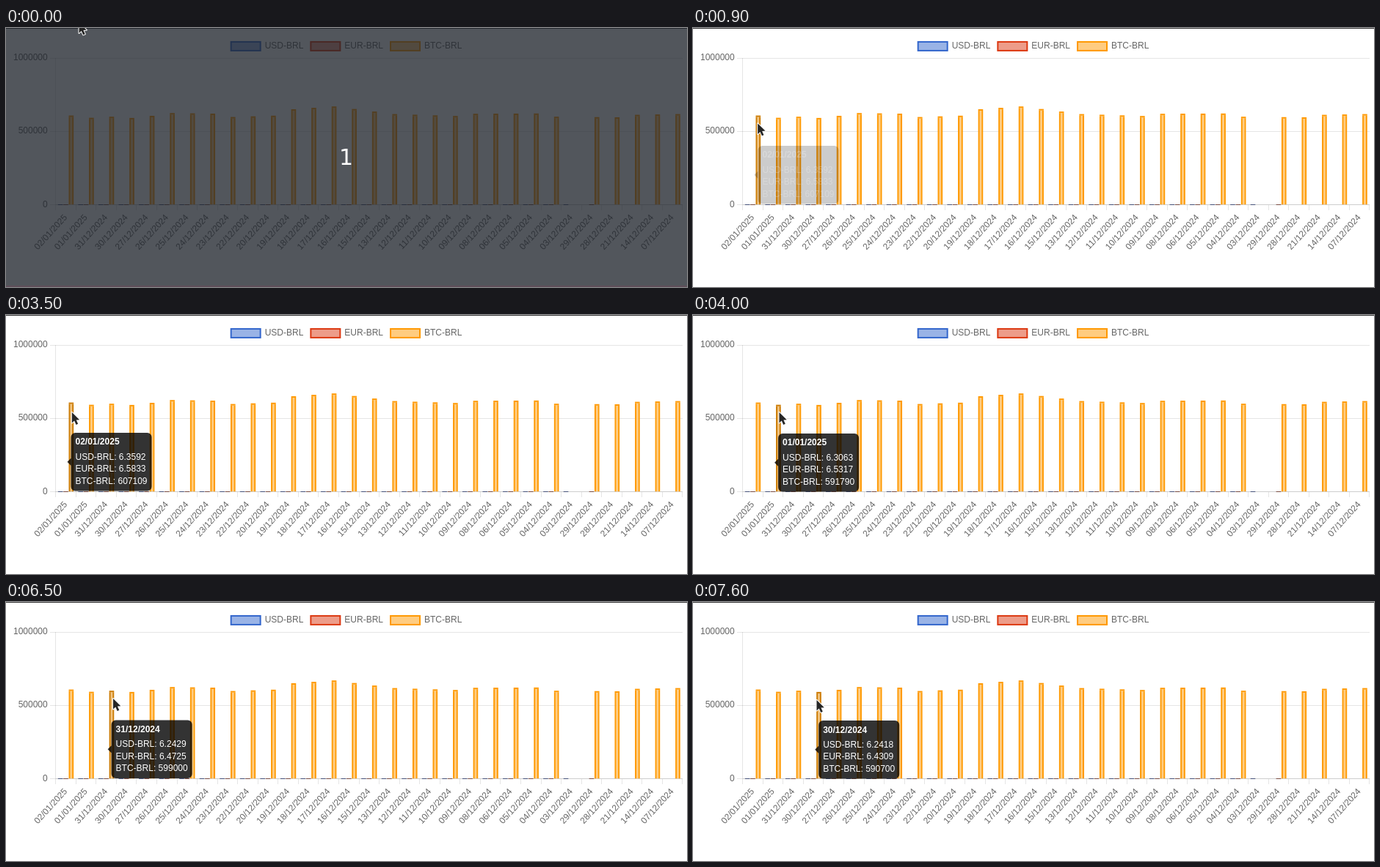
Animation, 928 px wide and 354 px high, one loop 8000 ms. Source, as an HTML page with a canvas:

```html
<!DOCTYPE html>
<html lang="en">
<head>
<meta charset="utf-8">
<title>Exchange rates</title>
<style>
html, body { margin: 0; width: 100%; height: 100%; overflow: hidden; background: #fff; }
canvas { display: block; width: 928px; height: 354px; }
</style>
</head>
<body>
<canvas id="stage" width="928" height="354"></canvas>
<script>
const ctx = document.getElementById('stage').getContext('2d');
const LOOP = 8000, STEP = 100;
const FONT = '12px "Liberation Sans", Arial, sans-serif';
const LEFT = 67.72, RIGHT = 921.9, BASE = 241.23, SCALE = 200.3e-6;
const LINE = 14.4, TILT = -47.7 * Math.PI / 180;

const series = [
  { name: 'USD-BRL', line: '#3366cc', fill: '#99b3e6', thin: '#46527a' },
  { name: 'EUR-BRL', line: '#dc3912', fill: '#ed9c89', thin: '#7a4c42' },
  { name: 'BTC-BRL', line: '#ff9900', fill: '#ffcc80' }
];

// Weekdays come first, days off follow at the end of the axis
const month = Array.from({ length: 29 }, (_, i) => 31 - i);
const isOff = d => d % 7 === 0 || d === 29;
const days = [...month.filter(d => !isOff(d)), ...month.filter(isOff)];
const dates = ['02/01/2025', '01/01/2025',
  ...days.map(d => String(d).padStart(2, '0') + '/12/2024')];
const NO_BTC = dates.indexOf('03/12/2024');

// Quotes shown in the tooltips
const quotes = [
  [6.3592, 6.5833, 607109],
  [6.3063, 6.5317, 591790],
  [6.2429, 6.4725, 599000],
  [6.2418, 6.4309, 590700]
];
// Later BTC prices, in thousands, run straight between these slots
const knots = [[4, 605], [5, 624], [7, 620], [8, 597], [10, 606], [11, 650], [13, 669],
  [16, 617], [19, 604], [20, 619], [23, 621], [24, 599], [27, 595], [28, 612], [30, 617]];

// Pointer moves: start, duration, goal x, goal y
const moves = [
  [400, 600, 87.5, 132.5], [3400, 400, 117, 132.5], [4900, 400, 144.5, 130.5],
  [6400, 100, 145.5, 131.5], [6600, 400, 166, 133.5], [7300, 100, 168, 133.5]
];
const hovers = [
  { from: 900, to: 3600, fade: 200 },
  { from: 3700, to: 5000, fade: 200 },
  { from: 5200, to: 6700, fade: 200 },
  { from: 7600, to: LOOP, fade: 50 }
];

const slotW = (RIGHT - LEFT) / dates.length;
const groupW = slotW * 0.8 / 3, barW = groupW * 0.9;
const clamp = v => Math.max(0, Math.min(1, v));
const mix = (a, b, k) => a + (b - a) * k;
const ease = k => k < 0.5 ? 4 * k ** 3 : 1 - 4 * (1 - k) ** 3;
const center = i => LEFT + slotW * (i + 0.5);
const barX = (i, k) => center(i) + (k - 1) * groupW - barW / 2;
const valueY = v => BASE - v * SCALE;

function price(i) {
  if (quotes[i]) return quotes[i][2];
  const n = knots.findIndex(k => k[0] >= i);
  const b = knots[n], a = knots[n - 1] || b;
  return 1000 * mix(b[1], a[1], (b[0] - i) / (b[0] - a[0] || 1));
}

function rect(color, x, y, w, h) {
  ctx.fillStyle = color;
  ctx.fillRect(x, y, w, h);
}

function text(str, x, y, color, align = 'left', font = FONT) {
  ctx.font = font;
  ctx.fillStyle = color;
  ctx.textAlign = align;
  ctx.textBaseline = 'middle';
  ctx.fillText(str, x, y);
}

function drawLegend() {
  series.forEach((s, i) => {
    const x = 306.67 + i * 108.67, y = 18.93;
    rect(s.fill, x, y, 40, 12);
    ctx.strokeStyle = s.line;
    ctx.lineWidth = 2;
    ctx.strokeRect(x, y, 40, 12);
    text(s.name, x + 46, y + 6, '#666');
  });
}

function drawAxes() {
  const grid = 'rgba(0,0,0,0.1)';
  for (const v of [1000000, 500000, 0]) {
    const y = valueY(v);
    rect(grid, 60, Math.round(y), 862, 1);
    text(v, LEFT - 11, y, '#666', 'right');
  }
  rect(grid, 67, 41, 1, 200);
  rect(grid, 67, 241, 855, 1);
  for (let i = 0; i <= dates.length; i++) {
    rect(grid, Math.floor(LEFT + i * slotW), 242, 1, 7);
  }
  dates.forEach((d, i) => {
    ctx.save();
    ctx.translate(center(i), BASE + 11 + LINE / 2 * Math.cos(TILT));
    ctx.rotate(TILT);
    text(d, 0, 0, '#666', 'right');
    ctx.restore();
  });
}

function drawBars(active) {
  dates.forEach((d, i) => {
    if (i <= NO_BTC) rect(series[0].thin, barX(i, 0), 241, barW, 1);
    if (i < NO_BTC || i === NO_BTC + 1) rect(series[1].thin, barX(i, 1), 241, barW, 1);
    if (i === NO_BTC) return;
    const x = barX(i, 2), y = valueY(price(i)), on = i === active;
    const line = on ? '#cc7a00' : series[2].line;
    rect(on ? '#f2c480' : series[2].fill, x + 2, y + 2, barW - 4, BASE - y - 2);
    rect(line, x, y, barW, 2);
    rect(line, x, y + 2, 2, BASE - y - 2);
    rect(line, x + barW - 2, y + 2, 2, BASE - y - 2);
  });
}

const tipPos = i => ({ x: center(i) + 7, y: (2 * BASE + valueY(price(i))) / 3 });

function drawTooltip(t) {
  const slot = hovers.filter(h => h.from <= t).length - 1;
  if (slot < 0) return;
  const { from, to, fade } = hovers[slot];
  const alpha = t < to ? clamp((t - from + 50) / fade) : 1 - clamp((t - to + 50) / fade);
  const old = tipPos(Math.max(0, slot - 1)), goal = tipPos(slot);
  const k = 1 - (1 - clamp((t - from + fade / 4) / (fade * 2))) ** 4;
  const slid = fade > 50 ? k : 1;
  const x = mix(old.x, goal.x, slid), y = mix(old.y, goal.y, slid);
  const rows = series.map((s, i) => s.name + ': ' + quotes[slot][i]);
  const height = 22 + 4 * LINE, top = y - height / 2;
  ctx.save();
  ctx.globalAlpha = alpha;
  ctx.font = FONT;
  const width = 12 + Math.max(...rows.map(r => ctx.measureText(r).width));
  ctx.fillStyle = 'rgba(0,0,0,0.8)';
  ctx.beginPath();
  ctx.roundRect(x, top, width, height, 6);
  ctx.moveTo(x, y - 5);
  ctx.lineTo(x, y + 5);
  ctx.lineTo(x - 5, y);
  ctx.closePath();
  ctx.fill();
  text(dates[slot], x + 6, top + 6 + LINE / 2, '#fff', 'left', 'bold ' + FONT);
  rows.forEach((r, i) => text(r, x + 6, top + 12 + LINE * 1.5 + i * (LINE + 2), '#fff'));
  ctx.restore();
}

function drawPointer(t) {
  let x = 99, y = -8;
  for (const [start, span, goalX, goalY] of moves) {
    const k = ease(clamp((t - start) / span));
    x = mix(x, goalX, k);
    y = mix(y, goalY, k);
  }
  ctx.save();
  ctx.translate(x, y);
  ctx.lineJoin = 'round';
  ctx.lineWidth = 2;
  ctx.strokeStyle = '#fff';
  ctx.fillStyle = '#262626';
  const arrow = new Path2D('M.5 .5V15L3.8 12 6.2 17.4 8.8 16.3 6.4 11 10.8 10.7Z');
  ctx.stroke(arrow);
  ctx.fill(arrow);
  ctx.restore();
}

function drawCountdown() {
  rect('rgba(31,36,44,0.77)', 0, 0, 928, 354);
  rect('#5f4f5a', 0, 352, 928, 2);
  text('1', 463.5, 179.5, '#fff', 'center', '30px "DejaVu Sans", sans-serif');
}

function draw(t) {
  rect('#fff', 0, 0, 928, 354);
  drawLegend();
  drawAxes();
  drawBars(hovers.findIndex(h => t >= h.from && t < h.to));
  drawTooltip(t);
  rect('#3a3a3a', 0, 0, 928, 1);
  if (t < 100) drawCountdown();
  drawPointer(t);
}

const start = performance.now();
function tick() {
  const t = (performance.now() - start) % LOOP;
  draw(Math.floor(t / STEP) * STEP);
  requestAnimationFrame(tick);
}
tick();
</script>
</body>
</html>
```
